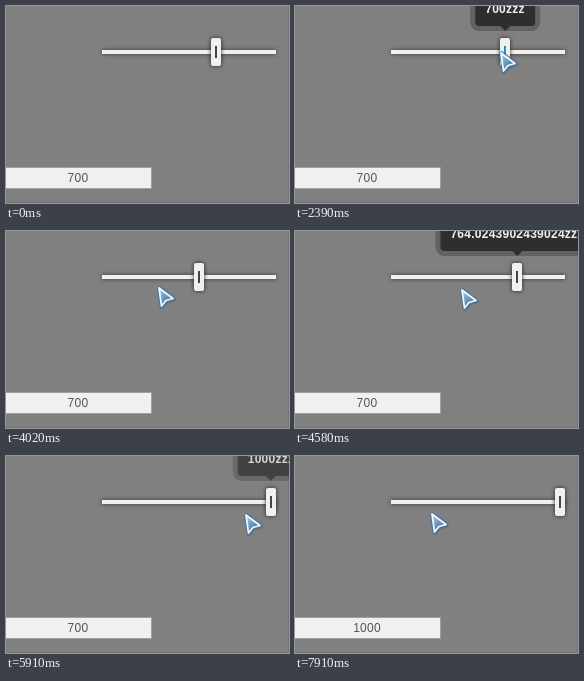
These frames come from a looping animation (283x197 px, 8 s). An HTML page:

```html
<!DOCTYPE html>
<html lang="en">
<head>
<meta charset="utf-8">
<title>Range slider</title>
<style>
  html, body { margin: 0; width: 100%; height: 100%; overflow: hidden; background: #808080; }
  body { position: relative; font: 12px/14px "Liberation Sans", Arial, sans-serif; letter-spacing: .25px; }
  body > * { position: absolute; box-sizing: border-box; }
  #edge { inset: 0; border: solid #747474; border-width: 0 1px 1px 0; }
  #track { left: 96px; top: 44px; width: 174px; height: 4px; background: #f0f0f0; box-shadow: 0 0 4px #333; }
  #handle { left: -5px; top: 32px; width: 10px; height: 28px; border-radius: 2px; background: #f0f0f0; box-shadow: 0 0 4px #222; }
  #handle i { position: absolute; left: 4px; top: 8px; width: 2px; height: 12px; background: #444; }
  #handle i + i { background: #1596d2; }
  #field { left: -2px; top: 161px; width: 148px; height: 22px; border: 1px solid #a0a0a0; background: #f0f0f0; color: #555; text-align: center; line-height: 20px; }
  #tip { left: 0; top: -14px; height: 34px; padding: 10px 10px 0; border-radius: 4px; background: #2e2e2e; box-shadow: 0 0 0 5px rgba(0, 0, 0, .24); color: #f0f0f0; font-weight: bold; white-space: nowrap; }
  #tip::after { content: ""; position: absolute; left: 50%; top: 34px; margin-left: -5px; border: 5px solid transparent; border-top-color: #2e2e2e; border-bottom: 0; }
  #cursor { left: 0; top: 0; overflow: visible; }
</style>
</head>
<body>
<div id="edge"></div>
<div id="track"></div>
<div id="field">700</div>
<div id="handle"><i></i><i id="hover"></i></div>
<div id="tip">700zzz</div>
<svg id="cursor" width="22" height="26">
  <defs>
    <linearGradient id="blue" x1="0" y1="0" x2=".6" y2="1">
      <stop offset="0" stop-color="#b4d0e6"/>
      <stop offset="1" stop-color="#2b6da4"/>
    </linearGradient>
    <path id="arrow" d="M2 2L16 12.5L9 14.5L4.500 20Z" stroke-linejoin="round"/>
  </defs>
  <use href="#arrow" x=".5" y=".5" fill="#3f6f9c" stroke="#3f6f9c" stroke-width="5" opacity=".7"/>
  <use href="#arrow" fill="url(#blue)" stroke="#f2f7fb" stroke-width="1.800"/>
</svg>
<script>
  const LOOP = 8000;
  const [handle, hover, tip, field, cursor] =
    ["handle", "hover", "tip", "field", "cursor"].map(id => document.getElementById(id));

  // Turning points of the pointer and the knob; motion eases between them.
  const pointerStops = [
    { at: 100, x: 284, y: 59 }, { at: 830, x: 201, y: 48 },
    { at: 1700, x: 205, y: 46 }, { at: 2600, x: 205, y: 46 },
    { at: 3290, x: 128, y: 53 }, { at: 3590, x: 128, y: 53 },
    { at: 4420, x: 174, y: 58 }, { at: 4900, x: 145, y: 58 },
    { at: 5410, x: 159, y: 59 }, { at: 6110, x: 258, y: 58 },
    { at: 6850, x: 183, y: 58 }, { at: 7450, x: 122, y: 58 }, { at: 7910, x: 136, y: 57 }
  ];
  const knobStops = [
    { at: 2600, x: 210 }, { at: 3190, x: 136 }, { at: 3590, x: 136 },
    { at: 4420, x: 244 }, { at: 4900, x: 159 }, { at: 5410, x: 201 }, { at: 5700, x: 265 }
  ];

  const ramp = (time, from, to) => Math.min(1, Math.max(0, (time - from) / (to - from)));
  const ease = p => p * p * (3 - 2 * p);

  // Adding each eased step gives the position after all turns so far.
  function follow(stops, axis, time) {
    let position = stops[0][axis];
    for (let i = 1; i < stops.length; i++) {
      const from = stops[i - 1], to = stops[i];
      position += (to[axis] - from[axis]) * ease(ramp(time, from.at, to.at));
    }
    return Math.round(position);
  }

  const valueAt = x => 100 + (x - 101) * 900 / 164;

  function draw(time) {
    const x = follow(knobStops, "x", time);
    const pointerX = follow(pointerStops, "x", time);
    const pointerY = follow(pointerStops, "y", time);

    cursor.style.visibility = time < 100 ? "hidden" : "visible";
    cursor.style.transform = `translate(${pointerX - 1}px, ${pointerY - 1}px)`;
    handle.style.transform = `translateX(${x}px)`;
    hover.style.opacity = ramp(time, 850, 1300) - ramp(time, 2690, 2900);
    tip.textContent = (time < 2690 ? 700 : valueAt(x)) + "zzz";
    tip.style.transform = `translateX(${x}px) translateX(-50%)`;
    tip.style.opacity = ramp(time, 1700, 2190) - ramp(time, 2900, 3190)
      + ramp(time, 4320, 4420) - ramp(time, 5850, 6100);
    field.textContent = time < 6010 ? "700" : "1000";
  }

  const start = performance.now();
  function tick() {
    draw((performance.now() - start) % LOOP);
    requestAnimationFrame(tick);
  }
  tick();
</script>
</body>
</html>
```
